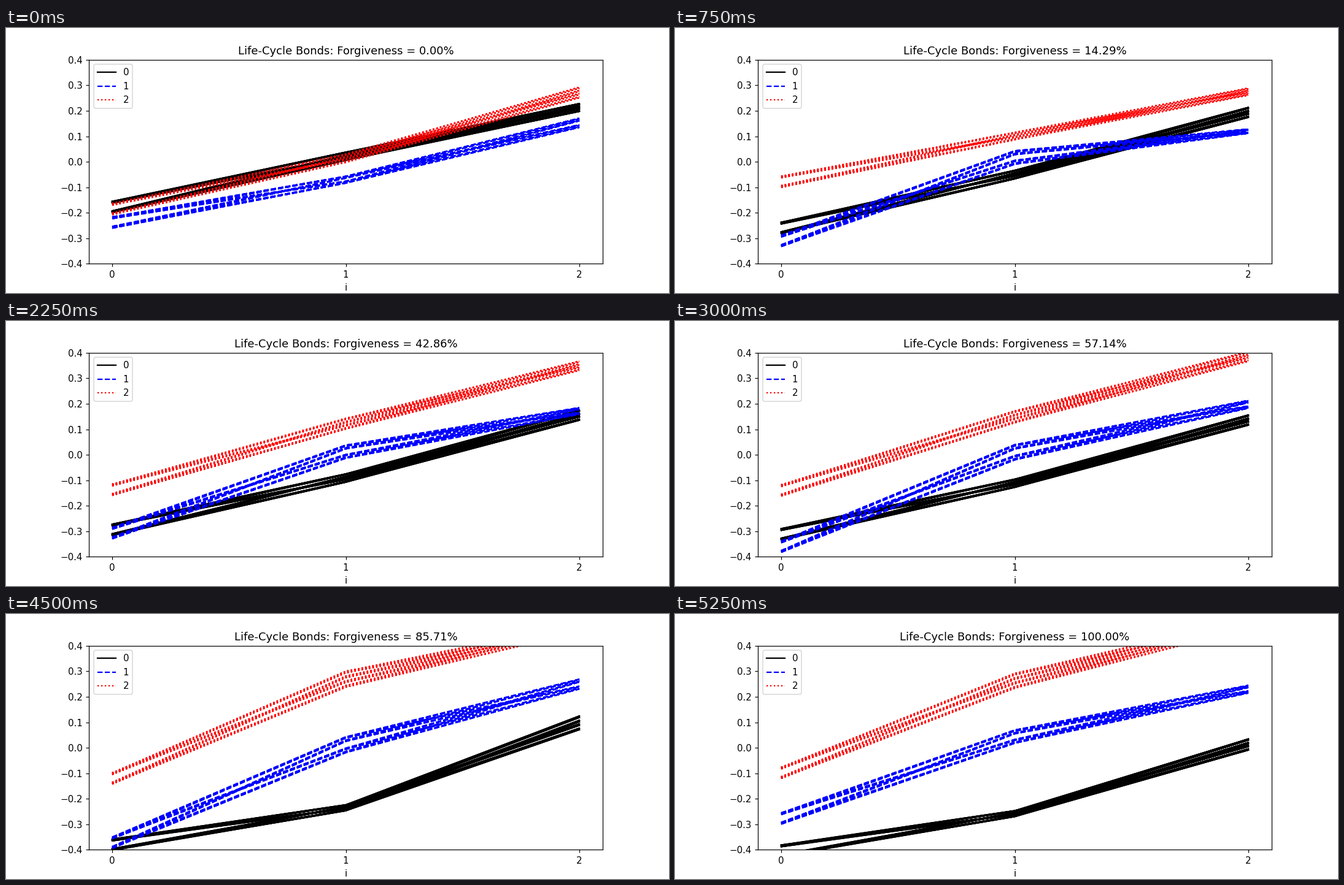
A matplotlib script for the animation above (6000 ms loop, 1080 by 432 pixels).

```python
from itertools import product

import matplotlib.pyplot as plt
import numpy as np
from matplotlib.animation import FuncAnimation

STEPS = 8
INTERVAL = 750
AGES = np.arange(3)

# Each type: color, line style, share of the spread due to the newest shock,
# and for every age the turning points {step: mean bond holding}.
TYPES = [
    ("black", "-", 0.58, (
        {0: -0.177, 1: -0.259, 5: -0.329, 6: -0.380, 7: -0.403},
        {0: 0.022, 1: -0.050, 5: -0.132, 6: -0.235, 7: -0.258},
        {0: 0.213, 6: 0.098, 7: 0.013})),
    ("blue", "--", 0.72, (
        {0: -0.238, 1: -0.310, 3: -0.307, 4: -0.360, 5: -0.269,
         6: -0.372, 7: -0.277},
        {0: -0.070, 1: 0.017, 4: 0.010, 5: -0.076, 6: 0.012, 7: 0.044},
        {0: 0.153, 1: 0.120, 6: 0.250, 7: 0.230})),
    ("red", ":", 0.60, (
        {0: -0.185, 1: -0.078, 3: -0.137, 5: -0.142, 7: -0.098},
        {0: 0.014, 1: 0.101, 3: 0.122, 5: 0.176, 6: 0.269, 7: 0.263},
        {0: 0.272, 1: 0.275, 5: 0.423, 6: 0.470, 7: 0.487})),
]

FIRST_SPREAD = 0.022   # half-width of the bundle at age 0
SPREAD_PER_RISE = 0.08  # half-width later on, per unit of mean savings
FIRST_LEAD = 0.85

# Every history of five good or bad shocks, the last one at age 2.
SHOCKS = np.array(list(product((1, -1), repeat=5)))


def paths(step, lead, tracks):
    """Bond holdings by age, one row per shock history."""
    mean = np.array([np.interp(step, list(t), list(t.values()))
                     for t in tracks])
    spread = np.append(FIRST_SPREAD, SPREAD_PER_RISE * np.diff(mean))
    newest = np.array([FIRST_LEAD, lead, lead])
    effect = (newest * SHOCKS[:, 2:5]
              + (1 - newest) * (0.75 * SHOCKS[:, 1:4] + 0.25 * SHOCKS[:, 0:3]))
    return mean + spread * effect


fig, ax = plt.subplots(figsize=(10, 4), dpi=108)
groups = []
for kind, (color, style, lead, tracks) in enumerate(TYPES):
    lines = ax.plot(AGES, paths(0, lead, tracks).T, color=color, ls=style)
    lines[0].set_label(str(kind))
    groups.append(lines)

ax.set_ylim(-0.4, 0.4)
ax.set_xticks(AGES)
ax.set_xlabel("i")
ax.legend(loc="upper left")
title = ax.set_title("")


def update(step):
    for lines, (_, _, lead, tracks) in zip(groups, TYPES):
        for line, values in zip(lines, paths(step, lead, tracks)):
            line.set_ydata(values)
    title.set_text(f"Life-Cycle Bonds: Forgiveness = {step / (STEPS - 1):.2%}")
    return [title]


anim = FuncAnimation(fig, update, frames=STEPS, interval=INTERVAL,
                     repeat=True, repeat_delay=0)
plt.show()
```
